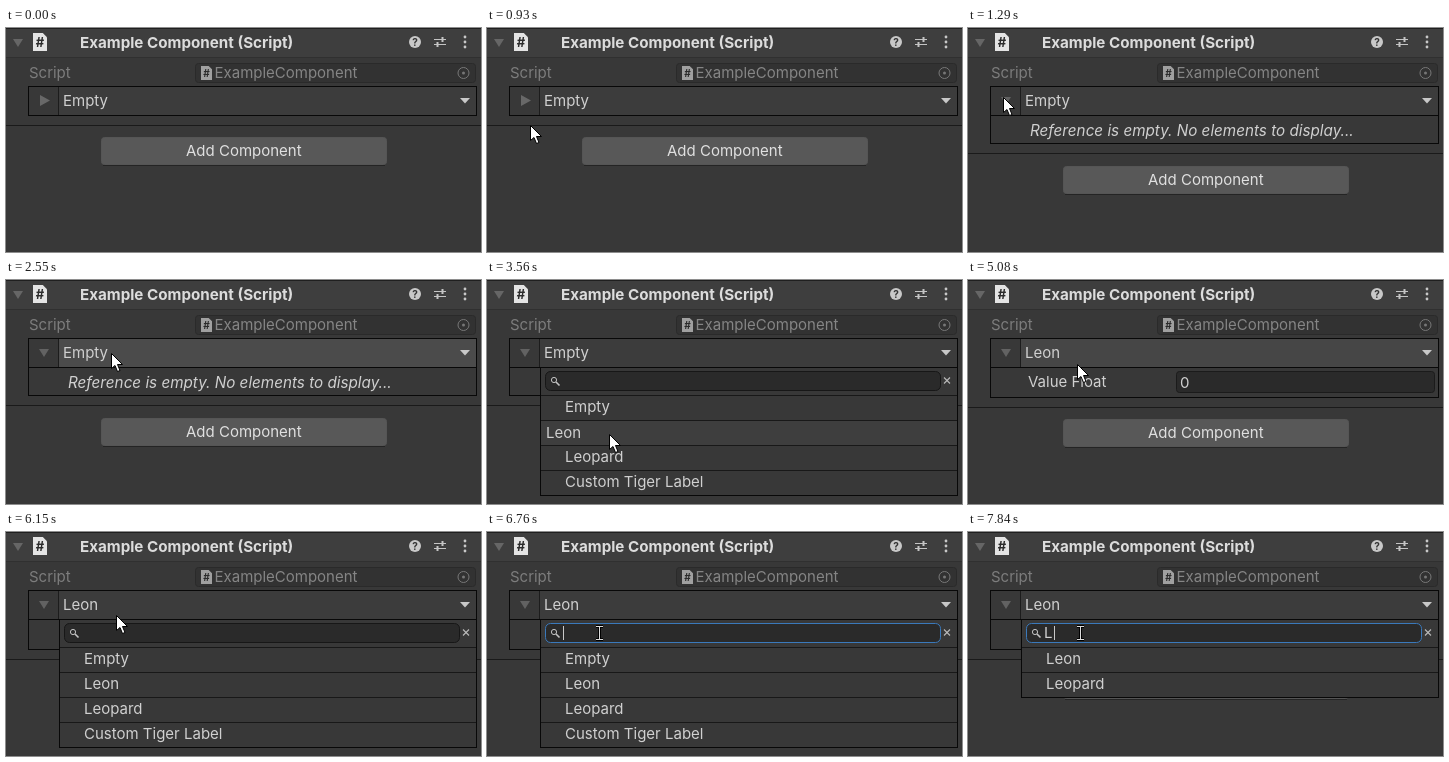
Write an HTML page with a canvas that moves like this. It is 475 px wide and 224 px high and loops after 8 s.

```html
<!DOCTYPE html>
<html lang="en">
<head>
<meta charset="utf-8">
<title>Component inspector</title>
<style>
  html, body { margin: 0; width: 100%; height: 100%; overflow: hidden; background: #383838; }
  canvas { display: block; }
</style>
</head>
<body>
<canvas id="stage" width="475" height="224"></canvas>
<script>
const ctx = document.getElementById('stage').getContext('2d');
const LOOP = 8000;
const FONT = '15px Inter, sans-serif';
const TITLE_FONT = 'bold 15.2px Inter, sans-serif';
const NOTE_FONT = 'italic 15.24px Inter, sans-serif';
const INK = '#d0d0d0';
const BLACK = '#080808';

// Moments at which the interface changes state.
const at = {
  expand: 1240, press: 2450, open: 2590, pick: 3980,
  pressAgain: 5320, reopen: 5460, hoverField: 6380, focus: 6680, type: 7840
};

// Pointer moves: start, end, and the points they join.
const moves = [
  [580, 1080, 62, 226, 38, 62],
  [1080, 1290, 38, 62, 35, 69],
  [1710, 2310, 35, 69, 105, 73],
  [3010, 3560, 105, 73, 122, 154],
  [4500, 5180, 122, 154, 108, 80],
  [5780, 5870, 108, 80, 110, 83],
  [6150, 6480, 110, 83, 112, 101]
];

function pointerAt(t) {
  let pos = [62, 226];
  for (const [start, end, x0, y0, x1, y1] of moves) {
    if (t < start) break;
    const p = Math.min(1, (t - start) / (end - start));
    const k = p * p * (3 - 2 * p);
    pos = [x0 + (x1 - x0) * k, y0 + (y1 - y0) * k];
  }
  return pos.map(Math.round);
}

function rect(x, y, w, h, color) {
  ctx.fillStyle = color;
  ctx.fillRect(x, y, w, h);
}

function frame(x, y, w, h, color) {
  ctx.strokeStyle = color;
  ctx.lineWidth = 1;
  ctx.strokeRect(x + .5, y + .5, w - 1, h - 1);
}

function rounded(x, y, w, h, r, fill, border) {
  ctx.beginPath();
  ctx.roundRect(x + .5, y + .5, w - 1, h - 1, r);
  ctx.fillStyle = fill;
  ctx.fill();
  ctx.strokeStyle = border;
  ctx.lineWidth = 1;
  ctx.stroke();
}

function text(str, x, y, color = INK, font = FONT, align = 'left') {
  ctx.font = font;
  ctx.fillStyle = color;
  ctx.textAlign = align;
  ctx.fillText(str, x, y);
}

function polygon(points, fill, border) {
  ctx.beginPath();
  for (const [x, y] of points) ctx.lineTo(x, y);
  ctx.closePath();
  ctx.fillStyle = fill;
  ctx.fill();
  if (border) {
    ctx.strokeStyle = border;
    ctx.lineWidth = 1;
    ctx.stroke();
  }
}

function line(x0, y0, x1, y1, color, width = 1) {
  ctx.beginPath();
  ctx.moveTo(x0, y0);
  ctx.lineTo(x1, y1);
  ctx.strokeStyle = color;
  ctx.lineWidth = width;
  ctx.stroke();
}

function circle(x, y, r, color, filled) {
  ctx.beginPath();
  ctx.arc(x, y, r, 0, Math.PI * 2);
  ctx.fillStyle = ctx.strokeStyle = color;
  ctx.lineWidth = 1;
  filled ? ctx.fill() : ctx.stroke();
}

function triangleDown(x, y, w, h, color) {
  polygon([[x, y], [x + w, y], [x + w / 2, y + h]], color);
}

function scriptIcon(x, y, w, h, paper) {
  const fold = w * .3;
  polygon([[x, y], [x + w - fold, y], [x + w, y + fold], [x + w, y + h], [x, y + h]], paper);
  text('#', x + w / 2, y + h * .8, '#2b2b2b', `bold ${Math.round(h * .72)}px Inter, sans-serif`, 'center');
}

function drawHeader() {
  rect(0, 0, 475, 29, '#3e3e3e');
  rect(0, 0, 475, 1, '#1f1f1f');
  rect(0, 29, 475, 1, '#303030');
  triangleDown(7, 11, 10, 8, '#666');
  scriptIcon(27, 5, 14, 18, '#e4e4e4');
  text('Example Component (Script)', 74, 20, '#dcdcdc', TITLE_FONT);

  circle(409, 14, 6, '#c8c8c8', true);
  text('?', 409, 18, '#333', 'bold 10px Inter, sans-serif', 'center');
  line(428, 11.5, 440, 11.5, '#c4c4c4');
  line(428, 16.5, 440, 16.5, '#c4c4c4');
  line(436.5, 9, 436.5, 14, '#c4c4c4', 2);
  line(431.5, 14, 431.5, 19, '#c4c4c4', 2);
  for (const y of [9, 14, 19]) circle(459, y, 1.4, '#c8c8c8', true);

  text('Script', 23, 50, '#7d7d7d');
  rounded(189, 35, 281, 20, 3, '#323232', '#2a2a2a');
  scriptIcon(195, 38, 11, 14, '#a0a0a0');
  text('ExampleComponent', 208.5, 50, '#858585');
  circle(457.5, 45, 5.5, '#777');
  circle(457.5, 45, 1.5, '#777', true);
}

function drawReference(state) {
  const { expanded, leon, barColor } = state;
  const bottom = !expanded ? 87 : leon ? 117 : 115;
  const divider = !expanded ? 97 : leon ? 127 : 125;
  const buttonY = !expanded ? 109 : leon ? 139 : 138;

  rect(53, 59, 417, 28, barColor);
  frame(22, 58, 449, bottom - 57, BLACK);
  rect(52, 59, 1, 28, '#1c1c1c');
  if (expanded) {
    rect(23, 87, 447, 1, BLACK);
    triangleDown(33, 69, 10, 8, '#626262');
  } else {
    polygon([[34, 67], [44, 72.5], [34, 78]], '#686868');
  }
  text(leon ? 'Leon' : 'Empty', 57, 78);
  triangleDown(454, 70, 10, 5.5, '#c8c8c8');

  if (leon) {
    text('Value Float', 60, 107);
    rounded(208, 91, 259, 22, 3, '#2a2a2a', '#1b1b1b');
    text('0', 212, 108);
  } else if (expanded) {
    text('Reference is empty. No elements to display...', 62, 108, INK, NOTE_FONT);
  }

  rect(0, divider, 475, 1, '#1a1a1a');
  rounded(95, buttonY, 286, 28, 3, '#585858', '#555');
  rect(97, buttonY + 28, 282, 1, '#242424');
  text('Add Component', 180, buttonY + 19, '#e0e0e0');
}

function drawPopup(state) {
  const { items, hovered, query, focused, fieldHover } = state;
  const height = 29 + items.length * 25;
  rect(53, 87, 418, height, '#383838');

  const border = focused ? '#3a79bb' : fieldHover ? '#656565' : '#171717';
  rounded(58, 91, 396, 20, 5, '#2a2a2a', border);
  circle(67, 100, 2.6, '#c4c4c4');
  line(69, 102, 72.5, 105.5, '#c4c4c4', 1.6);
  line(457, 97.5, 463, 103.5, '#bbb', 1.1);
  line(463, 97.5, 457, 103.5, '#bbb', 1.1);
  text(query, 76, 106);
  if (focused) rect(query ? 86 : 76, 94, 1, 14, '#c8c8c8');

  items.forEach((name, i) => {
    const y = 115 + i * 25;
    const active = i === hovered;
    if (active) rect(54, y, 416, 25, '#3e3e3e');
    rect(54, y, 416, 1, '#181818');
    text(name, active ? 59 : 78, y + (active ? 18 : 17));
  });
  frame(53, 87, 418, height, BLACK);
}

function drawArrow(x, y) {
  const shape = [[0, 0], [0, 15], [3.5, 12], [6, 18], [8.5, 17], [6, 11], [11, 11]];
  polygon(shape.map(([dx, dy]) => [x + dx + .5, y + dy + .5]), '#fff', '#000');
}

function drawIBeam(x, y) {
  for (const [color, width] of [['#000', 3], ['#ddd', 1]]) {
    line(x + .5, y - 7, x + .5, y + 7, color, width);
    line(x - 3, y - 6.5, x + 4, y - 6.5, color, width);
    line(x - 3, y + 6.5, x + 4, y + 6.5, color, width);
  }
}

function draw(t) {
  const [x, y] = pointerAt(t);
  const leon = t >= at.pick;
  const popup = (t >= at.open && t < at.pick) || t >= at.reopen;
  const pressed = (t >= at.press && t < at.open) || (t >= at.pressAgain && t < at.reopen);
  const lit = leon && t < at.reopen;

  rect(0, 0, 475, 224, '#383838');
  drawHeader();
  drawReference({
    expanded: t >= at.expand,
    leon,
    barColor: pressed ? '#4b4b4b' : lit ? '#464646' : '#3c3c3c'
  });

  if (popup) {
    const typed = t >= at.type;
    drawPopup({
      items: typed ? ['Leon', 'Leopard'] : ['Empty', 'Leon', 'Leopard', 'Custom Tiger Label'],
      hovered: y >= 115 ? Math.floor((y - 115) / 25) : -1,
      query: typed ? 'L' : '',
      focused: t >= at.focus,
      fieldHover: t >= at.hoverField
    });
  }

  if (t >= at.hoverField) drawIBeam(x, y);
  else if (t >= 580) drawArrow(x, y);
}

function tick() {
  draw(performance.now() % LOOP);
  requestAnimationFrame(tick);
}
tick();
</script>
</body>
</html>
```
